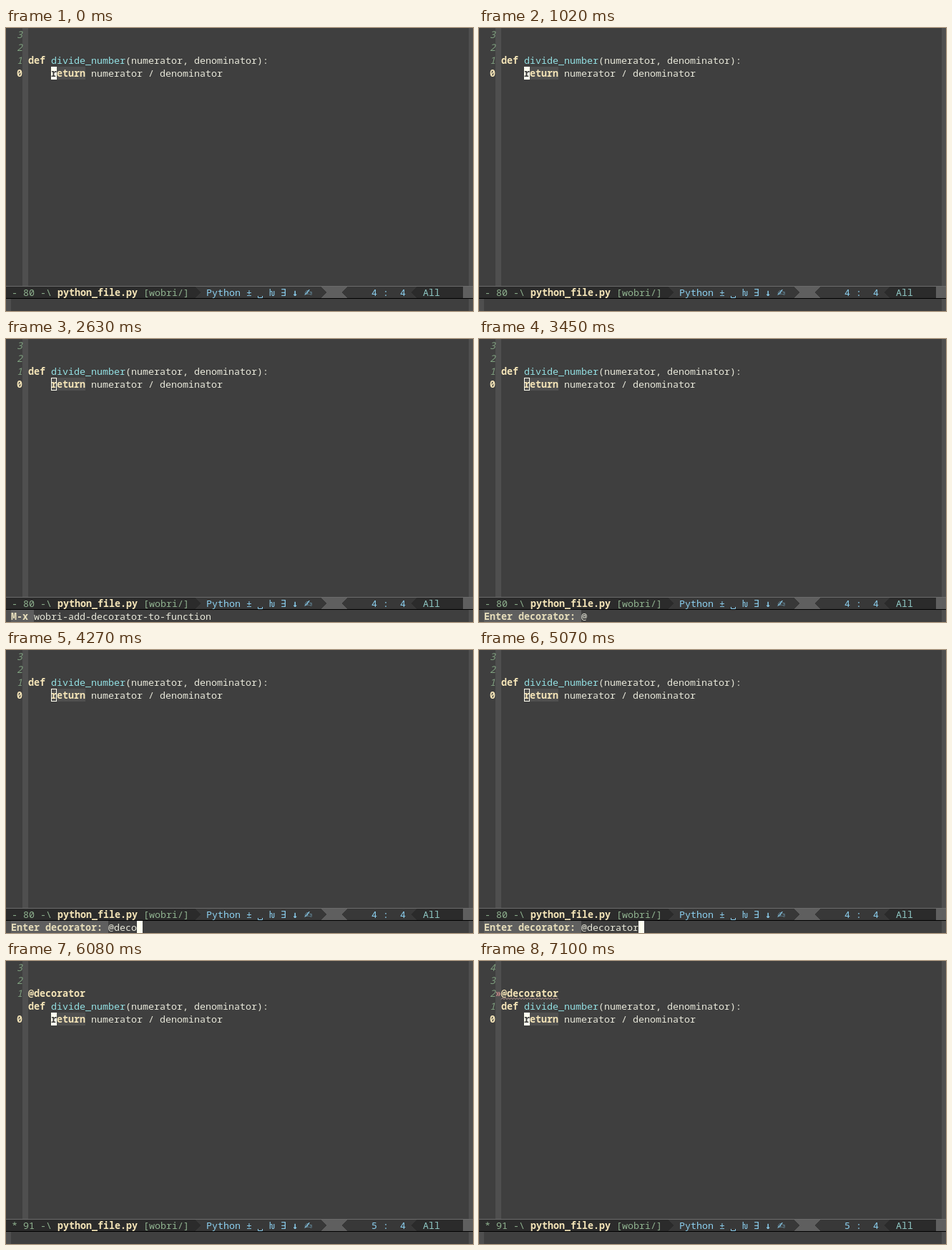
Recreate the animation shown at these times as an HTML page with a canvas. Size 653 px wide and 395 px high, loop 7.52 s.

```html
<!DOCTYPE html>
<html lang="en">
<head>
<meta charset="utf-8">
<title>Decorator demo</title>
<style>
html, body { margin: 0; width: 100%; height: 100%; overflow: hidden; background: #3f3f3f; }
canvas { display: block; }
</style>
</head>
<body>
<canvas id="stage" width="653" height="395"></canvas>
<script>
const ctx = document.getElementById('stage').getContext('2d');
const W = 653, H = 395, LOOP = 7520;
const CELL = 8, ROW = 18, TEXT_X = 31, MINI_X = 7, MINI_Y = 378, BAR_Y = 360;
const MONO = '"Noto Sans Mono", "DejaVu Sans Mono", monospace';
const SYMBOL = '"DejaVu Sans Mono", monospace';

const C = {
  bg: '#3f3f3f', fringe: '#4f4f4f', fg: '#e8e8da', yellow: '#f5e5b8',
  cyan: '#93e0e3', blue: '#8cd0f0', teal: '#8fc8c4', green: '#8fb28f', lineNo: '#7f9f7f',
  cursor: '#fffff0', dark: '#2b2b2b', mid: '#383838', light: '#5f5f5f',
  prompt: '#e8dfbc', mark: '#bc8383', wave: '#c4a29c'
};

const COMMAND = 'wobri-add-decorator-to-function';
const ASK = 'Enter decorator: ';

// start time, prompt, input, cursor column (-1 hides it)
const MINI = [
  [0, '', '', -1],
  [1220, 'M-x ', '', 4],
  [1620, 'M-x ', '', -1],
  [2230, 'M-x ', COMMAND, 4],
  [2630, 'M-x ', COMMAND, -1],
  [3050, ASK, '@', 18],
  [3450, ASK, '@', -1],
  [4060, ASK, '@de', 20],
  [4270, ASK, '@deco', 22],
  [4460, ASK, '@decor', 23],
  [4670, ASK, '@decora', 24],
  [4870, ASK, '@decorat', 25],
  [5070, ASK, '@decorator', 27],
  [5680, ASK, '@decorator', -1],
  [5880, ASK, '@decorator', 0],
  [6080, '', '', -1]
];

const EDIT_CURSOR = [
  [0, 'solid'], [400, 'off'], [1020, 'solid'], [1220, 'hollow'],
  [6080, 'solid'], [6500, 'off'], [7100, 'solid']
];

const at = (steps, t) => steps.filter(s => s[0] <= t).pop();

function rect(x, y, w, h, color) {
  ctx.fillStyle = color;
  ctx.fillRect(x, y, w, h);
}

function text(str, x, baseline, color, style = '', font = MONO) {
  ctx.font = `${style} 13.333px ${font}`;
  ctx.fillStyle = color;
  ctx.fillText(str, x, baseline);
}

function lineNumbers(labels) {
  labels.forEach((label, i) => {
    const current = label === '0';
    text(label, 15, i * ROW + 14, current ? C.yellow : C.lineNo, current ? 'bold' : 'italic');
  });
}

function defLine(y) {
  text('def', TEXT_X, y + 14, C.yellow, 'bold');
  text('divide_number', TEXT_X + 4 * CELL, y + 14, C.cyan);
  text('(numerator, denominator):', TEXT_X + 17 * CELL, y + 14, C.fg);
}

function returnLine(y, cursor) {
  const x = TEXT_X + 4 * CELL;
  rect(x, y, 6 * CELL, ROW, C.fringe);
  text('return', x, y + 14, C.yellow, 'bold');
  text('numerator / denominator', x + 7 * CELL, y + 14, C.fg);
  if (cursor === 'solid') {
    rect(x, y, CELL, ROW, C.cursor);
    text('r', x, y + 14, C.bg, 'bold');
  } else if (cursor === 'hollow') {
    ctx.strokeStyle = C.cursor;
    ctx.lineWidth = 1;
    ctx.strokeRect(x + 0.5, y + 0.5, CELL - 1, ROW - 1);
  }
}

function warning(y) {
  text('»', 23, y + 14, C.mark, 'bold');
  ctx.strokeStyle = C.wave;
  ctx.lineWidth = 1;
  ctx.beginPath();
  for (let i = 0; i <= 40; i++) ctx.lineTo(TEXT_X + i * 2, y + (i % 2 ? 15.5 : 17.5));
  ctx.stroke();
}

function editor(t) {
  const added = t >= 6080, checked = t >= 6500;
  rect(23, 0, 8, BAR_Y, C.fringe);
  rect(647, 0, 6, BAR_Y, C.fringe);
  lineNumbers(checked ? ['4', '3', '2', '1', '0']
    : added ? ['3', '2', '1', '', '0'] : ['3', '2', '1', '0']);
  if (added) text('@decorator', TEXT_X, 2 * ROW + 14, C.yellow, 'bold');
  if (checked) warning(2 * ROW);
  const top = (added ? 3 : 2) * ROW;
  defLine(top);
  returnLine(top + ROW, at(EDIT_CURSOR, t)[1]);
}

// A stepped arrow that points from a segment edge into its neighbour.
function tip(x, dir, color) {
  for (let i = 0; i < 16; i++) {
    rect(x, BAR_Y + 1 + i, dir * (Math.min(i, 15 - i) + 1), 1, color);
  }
}

function modeLine(t) {
  const added = t >= 6080, base = BAR_Y + 14;
  rect(0, BAR_Y, 264, ROW, C.dark);
  rect(264, BAR_Y, 176, ROW, C.mid);
  rect(440, BAR_Y, 38, ROW, C.light);
  rect(478, BAR_Y, 97, ROW, C.mid);
  rect(575, BAR_Y, 64, ROW, C.dark);
  rect(639, BAR_Y, 14, ROW, C.light);
  tip(264, 1, C.dark);
  tip(440, 1, C.mid);
  tip(478, -1, C.mid);
  tip(575, -1, C.dark);
  rect(0, BAR_Y, W, 1, '#6b6b6b');
  rect(0, MINI_Y - 1, W, 1, '#000');

  text(added ? '* 91 -\\' : '- 80 -\\', 8, base, C.green);
  text('python_file.py', 72, base, C.yellow, 'bold');
  text('[wobri/]', 192, base, C.green);
  text('Python ±', 280, base, C.blue);
  ctx.strokeStyle = C.blue;
  ctx.lineWidth = 1;
  ctx.beginPath();
  ctx.moveTo(352.5, base);
  ctx.lineTo(352.5, base + 2.5);
  ctx.lineTo(358.5, base + 2.5);
  ctx.lineTo(358.5, base);
  ctx.stroke();
  text('ƕ', 368, base, C.blue);
  text('∃', 384, base, C.blue, '', SYMBOL);
  text('↓', 400, base, C.blue, 'bold', SYMBOL);
  text('✍', 417, base, C.blue, 'bold', '"DejaVu Sans", sans-serif');
  text((added ? '5' : '4') + ' :  4', 511, base, C.blue);
  text('All', 583, base, C.teal);
}

function miniBuffer(t) {
  const [, prompt, input, col] = at(MINI, t);
  const base = MINI_Y + 14, inputX = MINI_X + prompt.length * CELL;
  rect(0, MINI_Y, MINI_X, ROW, C.fringe);
  rect(647, MINI_Y, 6, ROW, C.fringe);
  rect(MINI_X, MINI_Y, prompt.length * CELL, ROW, C.light);
  text(prompt, MINI_X, base, C.prompt, 'bold');
  text(input, inputX, base, C.fg);
  if (col < 0) return;
  const x = MINI_X + col * CELL;
  rect(x, MINI_Y, CELL, ROW, C.cursor);
  text((prompt + input).charAt(col), x, base, C.bg, col < prompt.length ? 'bold' : '');
}

const start = performance.now();

function draw() {
  const t = Math.max(0, performance.now() - start) % LOOP;
  rect(0, 0, W, H, C.bg);
  editor(t);
  modeLine(t);
  miniBuffer(t);
  requestAnimationFrame(draw);
}

draw();
</script>
</body>
</html>
```
